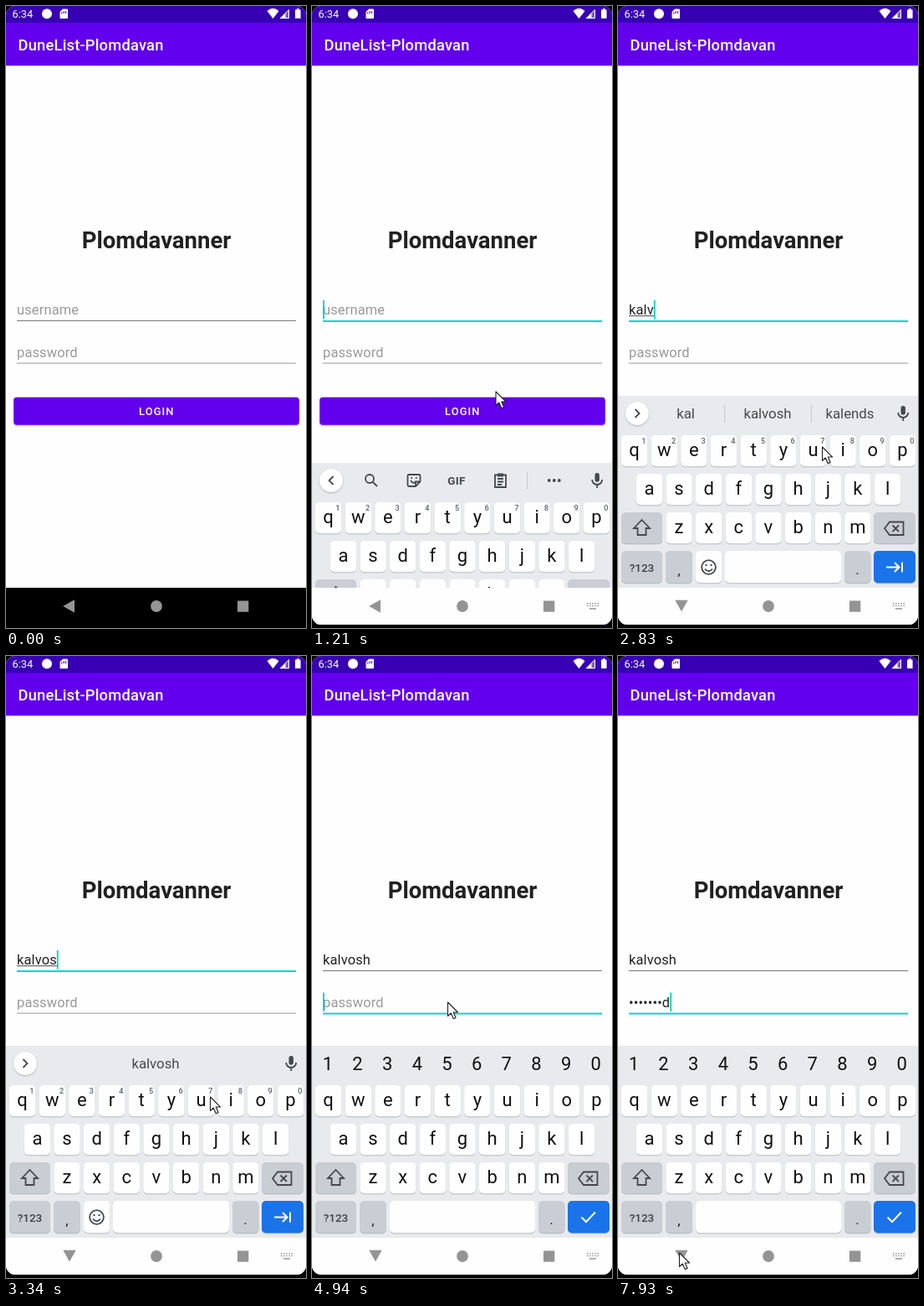
Animation of 359 by 742 pixels, one loop 8 s. Source, as an HTML page:

```html
<!DOCTYPE html>
<html lang="en">
<head>
<meta charset="utf-8">
<title>Login screen</title>
<style>
  html, body { margin: 0; width: 100%; height: 100%; overflow: hidden; background: #000; }
  svg { display: block; width: 359px; height: 742px; font-family: Roboto, sans-serif; }
  text { white-space: pre; }
  .mid { text-anchor: middle; }
  .field { font-size: 16.46px; letter-spacing: .009em; fill: #212121; }
  .hint { fill: #999; }
  .key { font-size: 22px; fill: #111; text-anchor: middle; }
  .mark { font-size: 17px; fill: #222; text-anchor: middle; }
  .sup { font-size: 9.2px; font-weight: 500; fill: #5f6368; text-anchor: middle; }
  .word { font-size: 16.8px; fill: #45494d; text-anchor: middle; }
  .line { fill: none; stroke: #45494d; stroke-width: 1.8; }
  .solid { fill: #45494d; }
  .sep { stroke: #c5c8cc; stroke-width: 1; }
</style>
</head>
<body>
<svg viewBox="0 0 359 742">
  <defs>
    <clipPath id="screen"><rect width="359" height="738" rx="11"/></clipPath>
    <filter id="soft" x="-5%" y="-20%" width="110%" height="150%">
      <feDropShadow dx="0" dy="1" stdDeviation=".8" flood-opacity=".28"/>
    </filter>
  </defs>
  <rect width="359" height="742"/>
  <g clip-path="url(#screen)">
    <rect width="359" height="695" fill="#fefefe"/>
    <rect y="20" width="359" height="51.200" fill="#6200ee"/>
    <rect width="359" height="20" fill="#3700b3"/>

    <g fill="#fff">
      <text x="7.500" y="14" font-size="12.800">6:34</text>
      <circle cx="49" cy="9.300" r="6"/>
      <path d="M68 3.500h5q1 0 1 1v9.500q0 1-1 1h-7.500q-1 0-1-1V7z"/>
      <path d="M66.800 7v2.500M69.200 6v3M71.600 6v3" stroke="#3700b3"/>
      <path d="M312.500 6q7-6.500 14 0L319.500 15z"/>
      <path d="M339 3.500V15H327.500z" fill-opacity=".35"/>
      <path d="M334.500 8v7H327.500z"/>
      <path d="M328.500 14.500L338.500 4.500V14.500z" fill="none" stroke="#fff"/>
      <path d="M346 4.500h1.800V3h3v1.500h1.800v10.300H346z"/>
      <text x="14.500" y="53" font-size="18.300" font-weight="500" letter-spacing=".23">DuneList-Plomdavan</text>
    </g>

    <text class="mid" x="180" y="289" font-size="27.500" font-weight="700" fill="#212121">Plomdavanner</text>

    <g id="fields"></g>

    <rect x="9.200" y="466.800" width="341.600" height="32.900" rx="3.600" fill="#6200ee" filter="url(#soft)"/>
    <text class="mid" x="180.300" y="488" font-size="12.800" font-weight="500" letter-spacing="1.14" fill="#fff">LOGIN</text>

    <g id="board">
      <rect y="465" width="359" height="290" fill="#e8eaed"/>
      <g id="keys"></g>
      <g id="toggle">
        <circle cx="23" cy="486" r="13.800" fill="#fff" filter="url(#soft)"/>
        <path id="chevron" class="line" d="M25.500 481L20.500 486L25.500 491"/>
        <rect class="solid" x="338.500" y="477" width="5.400" height="10.800" rx="2.700"/>
        <path class="line" d="M335.200 485a6 6 0 0 0 12 0M341.200 491v4"/>
      </g>
      <g id="tools">
        <circle class="line" cx="69" cy="484" r="5"/>
        <path class="line" d="M72.500 487.500L78 493"/>
        <path class="line" d="M116 479h12q1.500 0 1.500 1.500v7l-5.500 5.500h-8q-1.500 0-1.500-1.500v-11q0-1.500 1.500-1.500zM129 487.500h-5v5M118 486q3.500 5 6.500 1M118.500 483h1.500M124 483h1.500"/>
        <text class="mid solid" x="173" y="490.700" font-size="13.500" font-weight="700" letter-spacing=".3">GIF</text>
        <path class="line" d="M219 479.500h13v14.500h-13zM222 484h7M222 487.500h7M222 491h5"/>
        <path class="solid" d="M222 477.500h7v4h-7z"/>
        <path class="sep" d="M257.500 476v20"/>
        <g class="solid"><circle cx="283.800" cy="486" r="1.900"/><circle cx="289.800" cy="486" r="1.900"/><circle cx="295.800" cy="486" r="1.900"/></g>
      </g>
      <g id="words">
        <path id="seps" class="sep" d="M127.500 476v21M231.500 476v21"/>
        <text class="word" x="81" y="492"></text>
        <text class="word" x="179" y="492"></text>
        <text class="word" x="277.500" y="492"></text>
      </g>
      <g id="digits"></g>
    </g>

    <rect id="nav" y="694" width="359" height="44"/>
    <g fill="#949494">
      <path id="back" d="M68.200 716L82 708.300V723.700z"/>
      <circle cx="180" cy="716" r="6.900"/>
      <rect x="277" y="709.500" width="13.300" height="13.300" rx=".6"/>
      <g id="switcher">
        <path d="M329 712.800h14M329 715.600h14" stroke="#949494" stroke-width="1.500" stroke-dasharray="1.500 1.600"/>
        <path d="M332 719h8" stroke="#949494" stroke-width="1.400"/>
      </g>
    </g>
  </g>
  <path id="pointer" d="M0 0V16.500L3.800 13L6.800 19.800L9.600 18.500L6.700 12H12z" fill="#fff" stroke="#222" stroke-width="1.100" stroke-linejoin="round"/>
</svg>

<script>
const LOOP = 8000;
const USER = "kalvosh", SECRET = "password";
const $ = id => document.getElementById(id);

function add(parent, tag, attrs, text) {
  const el = document.createElementNS("http://www.w3.org/2000/svg", tag);
  for (const k in attrs) el.setAttribute(k, attrs[k]);
  if (text) el.textContent = text;
  parent.appendChild(el);
  return el;
}
const show = (el, on) => el.setAttribute("visibility", on ? "inherit" : "hidden");
const set = (el, attrs) => { for (const k in attrs) el.setAttribute(k, attrs[k]); };

// Keyboard
const PITCH = 35.65, keys = $("keys");

function key(x, y, w, fill = "#fefefe", h = 37.2) {
  const g = add(keys, "g", {});
  add(g, "rect", { x, y: y + 1, width: w, height: h, rx: 5, fill: "#b4b8bd" });
  add(g, "rect", { x, y, width: w, height: h, rx: 5, fill });
  return g;
}
function row(letters, first, y, numbered) {
  [...letters].forEach((c, i) => {
    const x = first + i * PITCH;
    const g = key(x - 15.7, y, 31.4);
    add(g, "text", { class: "key", x, y: y + 25 }, c);
    if (!numbered) return;
    const digit = String((i + 1) % 10);
    supers.push(add(g, "text", { class: "sup", x: x + 11.3, y: y + 10 }, digit));
    add($("digits"), "text", { class: "key", x: x - .7, y: 494 }, digit);
  });
}
const supers = [], GREY = "#c9cdd4", WHITE = "#fefefe", LOW = 38.2;
row("qwertyuiop", 19.6, 512, true);
row("asdfghjkl", 37.4, 558);
row("zxcvbnm", 73, 604);

const shift = key(4, 604, 49, GREY), erase = key(306, 604, 50, GREY);
add(shift, "path", { class: "line", d: "M28.500 613L38 623H33.500V631H23.500V623H19z" });
add(erase, "path", { class: "line", d: "M325 615.500H341.500V631H325L319 623.200zM328.500 619.500l7.500 7.500M336 619.500l-7.500 7.500" });

const symbols = key(4, 650, 49, GREY, LOW);
add(symbols, "text", { class: "mid", x: 28.5, y: 674.5, "font-size": 13.5, "font-weight": 500, fill: "#3c4043" }, "?123");
add(key(57, 650, 32, GREY, LOW), "text", { class: "mark", x: 73, y: 679 }, ",");
const emoji = key(93, 650, 31.4, WHITE, LOW);
add(emoji, "circle", { class: "line", cx: 108.5, cy: 669.5, r: 8.4 });
add(emoji, "path", { class: "line", d: "M104 671.500q4.500 5.500 9 0M104.500 667h2M110.500 667h2" });
const space = key(128, 650, 139, WHITE, LOW), wideSpace = key(93, 650, 174, WHITE, LOW);
add(key(271, 650, 31.4, GREY, LOW), "text", { class: "mark", x: 286.5, y: 678 }, ".");
const enter = key(306, 650, 50, "#1a73e8", LOW);
const stroke = { fill: "none", stroke: "#fff", "stroke-width": 2 };
const tab = add(enter, "path", { ...stroke, d: "M321 669.500H336M331 664l5.500 5.500l-5.500 5.500M340 663.500v12" });
const check = add(enter, "path", { ...stroke, d: "M322.500 669.500l5.500 5.500l11-11.500" });

// Input fields
function field(y, hint, rest) {
  const g = add($("fields"), "g", { transform: `translate(0 ${y})` });
  const label = add(g, "text", { class: "field hint", x: 13, y: 17 }, hint);
  const text = add(g, "text", { class: "field", x: 13, y: 17 });
  const mark = add(g, "rect", { x: 13, y: 18.2, height: 1, fill: "#444" });
  const rule = add(g, "rect", { x: 13, width: 334 });
  const caret = add(g, "rect", { y: 0, width: 1.8, height: 22.5, fill: "#08cdbb" });
  return (value, focus, lit, composing) => {
    text.textContent = value;
    const w = value ? text.getComputedTextLength() : 0;
    show(label, !value);
    show(mark, composing && value);
    mark.setAttribute("width", w);
    set(rule, focus ? { y: 24, height: 2, fill: "#03dac5" } : { y: 24, height: 1, fill: rest });
    caret.setAttribute("x", 13 + w);
    show(caret, focus && lit);
  };
}
const userField = field(351, "username", "#777");
const passField = field(401.6, "password", "#999");

// Timing
const userTimes = [2310, 2590, 2710, 2830, 3080, 3210, 3350];
const passTimes = [5560, 5710, 6020, 6150, 6280, 6410, 6560, 6680];
const caretOff = [[1480, 1910], [3950, 4370], [5340, 5560], [7210, 7640]];
const path = [
  [310, 100, 640], [440, 112, 575], [570, 126, 505], [700, 142, 440], [830, 156, 390],
  [960, 166, 366], [1090, 188.5, 388.5], [1210, 220, 460], [1330, 244.5, 526],
  [4090, 238, 524], [4220, 207.5, 511], [4370, 178, 455], [4520, 162.5, 413],
  [7360, 150, 452], [7500, 124, 545], [7640, 96, 640], [7790, 79, 698], [7930, 73.5, 712]
];
const between = (t, [a, b]) => t >= a && t < b;
const typed = (t, times) => times.filter(s => t >= s).length;

function suggestions(t) {
  if (t < 2830) return ["ka", "kale", "kalends"];
  if (t < 3080) return ["kal", USER, "kalends"];
  return ["", USER, ""];
}

function draw(t) {
  const lit = !caretOff.some(r => between(t, r));
  const second = t >= 4660, secret = t >= 4800;
  const n = typed(t, passTimes);
  userField(USER.slice(0, typed(t, userTimes)), between(t, [960, 4660]), lit, !second);
  passField(n ? "•".repeat(n - 1) + SECRET[n - 1] : "", second, lit, false);

  const open = t >= 1210, words = t >= 2590 && !secret;
  show($("board"), open);
  $("board").setAttribute("transform", `translate(0 ${t < 1330 ? 80 : 0})`);
  show($("tools"), t < 2590);
  show($("words"), words);
  show($("toggle"), !secret);
  show($("digits"), secret);
  $("chevron").setAttribute("transform", words ? "rotate(180 23 486)" : "");
  const list = suggestions(t);
  $("words").querySelectorAll("text").forEach((el, i) => el.textContent = list[i]);
  show($("seps"), list[0]);
  supers.forEach(el => show(el, !secret));
  [emoji, space, tab].forEach(el => show(el, !secret));
  [wideSpace, check].forEach(el => show(el, secret));

  $("nav").setAttribute("fill", open ? "#fefefe" : "#000");
  show($("switcher"), t >= 1090);
  const turn = t < 1480 ? 0 : t < 1630 ? -60 : -90;
  $("back").setAttribute("transform", `rotate(${turn} 75.350 715.350)`);

  const spot = path.filter(p => t >= p[0]).pop();
  show($("pointer"), spot);
  if (spot) $("pointer").setAttribute("transform", `translate(${spot[1]} ${spot[2]})`);
}

const start = performance.now();
function frame() {
  draw((performance.now() - start) % LOOP);
  requestAnimationFrame(frame);
}
frame();
</script>
</body>
</html>
```
